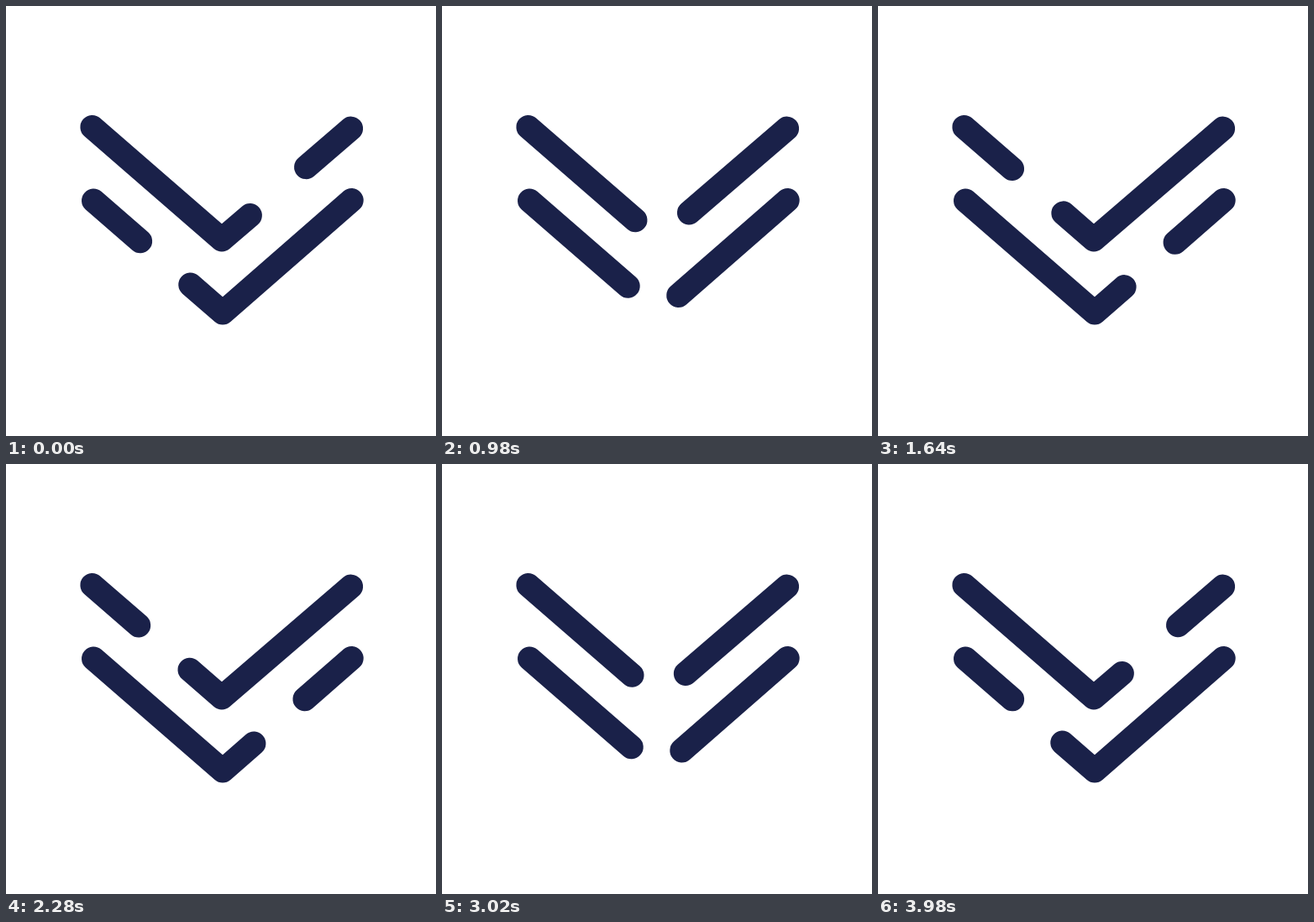
An HTML page with a canvas that plays this animation: 512 by 512 pixels, repeating every 4 s.

```html
<!DOCTYPE html>
<html lang="en">
<head>
<meta charset="utf-8">
<title>Chevrons</title>
<style>
  html, body { margin: 0; width: 100%; height: 100%; overflow: hidden; background: #fff; }
  canvas { display: block; width: 100vmin; height: 100vmin; margin: auto; }
</style>
</head>
<body>
<canvas id="stage" width="512" height="512"></canvas>
<script>
const ctx = document.getElementById('stage').getContext('2d');
const LOOP = 4000, HALF = LOOP / 2, LAG = 8;
const HANDLE = 0.73;

// Gap edges are distances along the path, measured from the apex (left is negative).
const chevrons = [
  { left: [102.7, 144.2], apex: [257, 278.2], right: [410.8, 145.9],
    start: [44.3, 132.4], end: [-133.7, -53.2] },
  { left: [104.3, 231.8], apex: [258, 365.2], right: [411.4, 231.3],
    start: [-130, -50.9], end: [51.8, 132.3] }
];

const mix = (a, b, k) => a + (b - a) * k;

// Cubic bezier easing (HANDLE, 0, 1 - HANDLE, 1), solved by bisection.
function ease(u) {
  let lo = 0, hi = 1;
  for (let i = 0; i < 30; i++) {
    const s = (lo + hi) / 2, r = 1 - s;
    const x = 3 * r * r * s * HANDLE + 3 * r * s * s * (1 - HANDLE) + s * s * s;
    if (x < u) lo = s; else hi = s;
  }
  return lo * lo * (3 - 2 * lo);
}

function pointAt(c, dist) {
  const tip = dist < 0 ? c.left : c.right;
  const dx = tip[0] - c.apex[0], dy = tip[1] - c.apex[1];
  const k = Math.abs(dist) / Math.hypot(dx, dy);
  return [c.apex[0] + dx * k, c.apex[1] + dy * k];
}

function stroke(points) {
  ctx.beginPath();
  points.forEach(p => ctx.lineTo(p[0], p[1]));
  ctx.stroke();
}

function drawChevron(c, k) {
  const from = mix(c.start[0], c.end[0], k);
  const to = mix(c.start[1], c.end[1], k);
  stroke([c.left, ...(from > 0 ? [c.apex] : []), pointAt(c, from)]);
  stroke([pointAt(c, to), ...(to < 0 ? [c.apex] : []), c.right]);
}

function draw(now) {
  const t = (now - LAG + LOOP) % LOOP;
  const k = t < HALF ? ease(t / HALF) : 1 - ease(t / HALF - 1);
  ctx.fillStyle = '#fff';
  ctx.fillRect(0, 0, 512, 512);
  ctx.strokeStyle = '#1a2149';
  ctx.lineWidth = 28.6;
  ctx.lineCap = ctx.lineJoin = 'round';
  chevrons.forEach(c => drawChevron(c, k));
}

let began = null;
function tick(now) {
  if (began === null) began = now;
  draw(now - began);
  requestAnimationFrame(tick);
}
draw(0);
requestAnimationFrame(tick);
</script>
</body>
</html>
```
